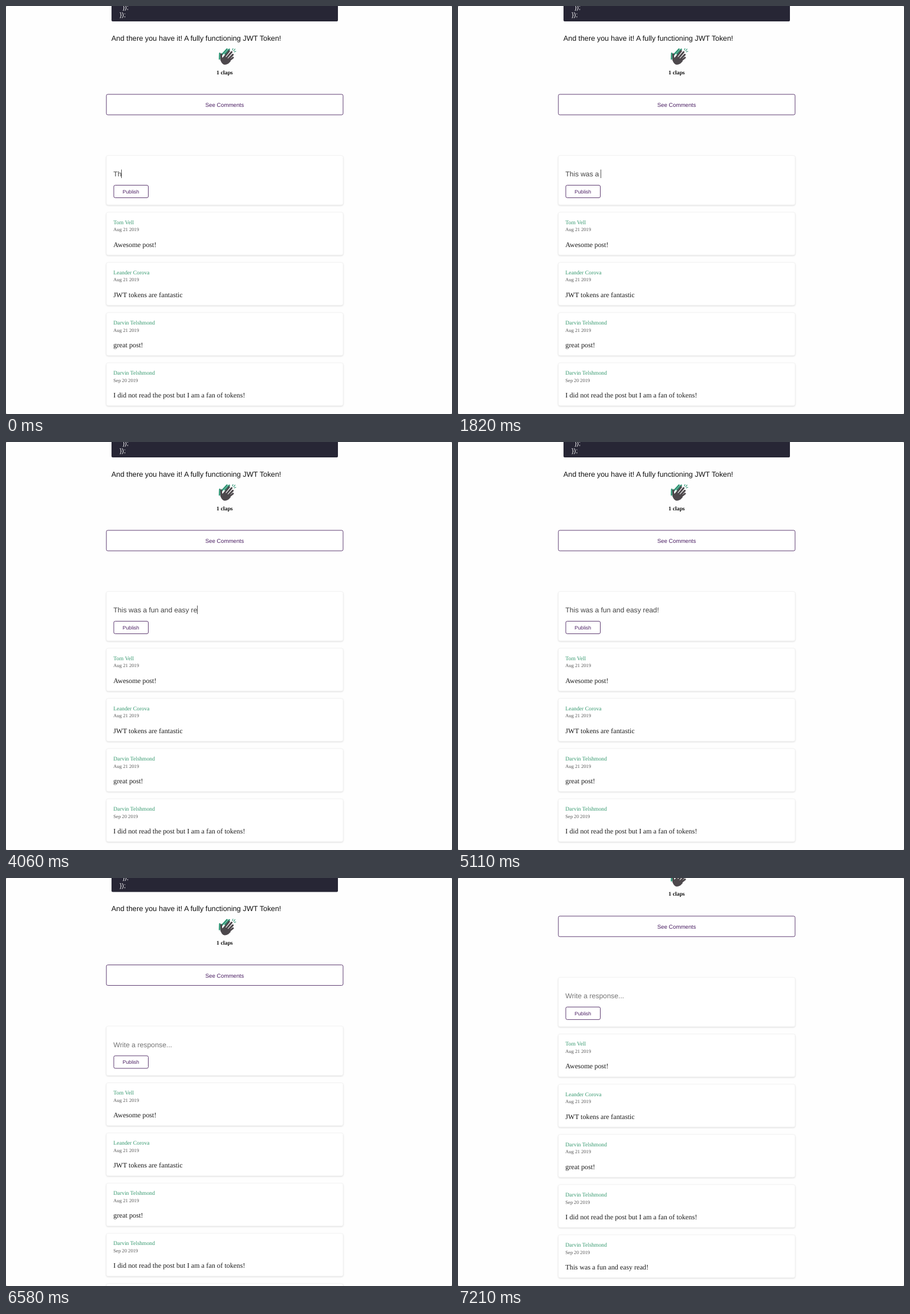
Write an HTML page that moves like this. It is 782x716 px and loops after 7910 ms.

```html
<!DOCTYPE html>
<html lang="en">
<head>
<meta charset="utf-8">
<title>Comment form</title>
<style>
  html, body { margin: 0; width: 100%; height: 100%; overflow: hidden; background: #fefefe; }
  svg { display: block; }
  text { white-space: pre; text-rendering: geometricPrecision; }
  .sans { font-family: "Liberation Sans", Arial, sans-serif; }
  .serif { font-family: "Liberation Serif", "Times New Roman", serif; }
  .card { fill: #fff; stroke: #f3f3f3; filter: drop-shadow(0 1px 1px rgba(0, 0, 0, .13)); }
  .button { fill: #fff; stroke: #5d3a70; }
  .purple { fill: #4b1f63; }
  .name { font-size: 9.8px; fill: #36996f; }
  .date { font-size: 8.6px; fill: #555; }
  .body { font-size: 12.28px; fill: #1c1c1c; }
  .input { font-size: 12.3px; }
</style>
</head>
<body>
<svg width="782" height="716" viewBox="0 0 782 716">
  <g id="page">
    <rect x="185" y="-20" width="397" height="47" rx="2" fill="#272635"/>
    <g class="sans" font-size="11" fill="#fff">
      <text x="204.4" y="5.5">});</text>
      <text x="199.3" y="19">});</text>
    </g>
    <text class="sans" x="184.8" y="60.7" font-size="12.8" fill="#111">And there you have it! A fully functioning JWT Token!</text>

    <g fill="none" stroke-linecap="round" stroke-linejoin="round">
      <path d="M374.4 93 L374.8 83 M378 86 L387.5 75.6 M384 84 L391.5 76" stroke="#2f9474" stroke-width="2.6"/>
      <path d="M397 77.5 L398 74.5 M399.3 78.6 L401.6 75.4 M400.3 80.6 L403 79.6" stroke="#2f9474" stroke-width="1.1"/>
      <path d="M380 93 L391.2 79 M383.5 95 L395.6 80.8 M386.5 97 L397.7 85.4 M388 98.5 L398 90.6 M377.4 84.5 L377.6 95" stroke="#4d484c" stroke-width="3.1"/>
    </g>
    <path d="M376 92 L381 90 L385 89 L392 94 L394 97 L390 101 Q384 104.5 380.5 102 Q376 98.5 376 92Z" fill="#4d484c"/>

    <text class="serif" x="383.4" y="119.5" font-size="9.8" font-weight="bold" text-anchor="middle" fill="#111">1 claps</text>
    <rect class="button" x="176" y="155" width="415" height="36" rx="2.5"/>
    <text class="sans purple" x="383.3" y="177" font-size="9.85" text-anchor="middle">See Comments</text>

    <rect class="card" x="176" y="262.5" width="415" height="86.5" rx="3"/>
    <text id="input" class="sans input" x="188.3" y="299.2"></text>
    <rect id="caret" y="287" width="1" height="15" fill="#555"/>
    <rect class="button" x="189" y="314.5" width="60.5" height="22" rx="2.5"/>
    <text class="sans purple" x="219" y="328.7" font-size="8.8" text-anchor="middle">Publish</text>
    <g id="comments"></g>
  </g>
  <path d="M0 0h2L0 2z M782 0v2l-2-2z M0 716v-2l2 2z M782 716h-2l2-2z" fill="#ccc"/>
</svg>
<script>
  const LOOP = 7910;
  const MESSAGE = "This was a fun and easy read!";
  const START_LENGTH = 2;
  // Moment at which each further character is typed.
  const KEY_TIMES = [
    70, 280, 350, 700, 980, 1050, 1330, 1540, 1820, 1960, 2100, 2240, 2380, 2590,
    2730, 2940, 3080, 3220, 3360, 3430, 3640, 3780, 3920, 4060, 4200, 4270, 4550
  ];
  const CARET_OFF = 5110, CLEARED = 5670, POSTED = 6090, SCROLL_START = 6580, SCROLL_END = 6650;
  const PITCH = 88.1;
  const COMMENTS = [
    ["Tom Vell", "Aug 21 2019", "Awesome post!"],
    ["Leander Corova", "Aug 21 2019", "JWT tokens are fantastic"],
    ["Darvin Telshmond", "Aug 21 2019", "great post!"],
    ["Darvin Telshmond", "Sep 20 2019", "I did not read the post but I am a fan of tokens!"],
    ["Darvin Telshmond", "Sep 20 2019", MESSAGE]
  ];

  const byId = id => document.getElementById(id);
  const page = byId("page"), input = byId("input"), caret = byId("caret"), list = byId("comments");

  list.innerHTML = COMMENTS.map(([name, date, body], i) => `
    <g class="serif" transform="translate(0 ${i * PITCH})">
      <rect class="card" x="176" y="362" width="415" height="75" rx="3"/>
      <text class="name" x="188.3" y="382.6">${name}</text>
      <text class="date" x="188.3" y="395.4">${date}</text>
      <text class="body" x="188.3" y="422.6">${body}</text>
    </g>`).join("");
  const newComment = list.lastElementChild;

  function scrollAt(t) {
    if (t < SCROLL_START) return 0;
    return t < SCROLL_END ? 2.5 : PITCH;
  }

  function render(t) {
    const cleared = t >= CLEARED;
    const typed = START_LENGTH + KEY_TIMES.filter(time => time <= t).length;
    input.textContent = cleared ? "Write a response..." : MESSAGE.slice(0, typed);
    input.setAttribute("fill", cleared ? "#757575" : "#444");
    caret.setAttribute("x", Math.floor(188.3 + input.getComputedTextLength()));
    caret.setAttribute("visibility", t < CARET_OFF ? "visible" : "hidden");
    newComment.setAttribute("visibility", t >= POSTED ? "visible" : "hidden");
    page.setAttribute("transform", `translate(0 ${-scrollAt(t)})`);
  }

  const start = performance.now();
  function tick() {
    render((performance.now() - start) % LOOP);
    requestAnimationFrame(tick);
  }
  tick();
</script>
</body>
</html>
```
